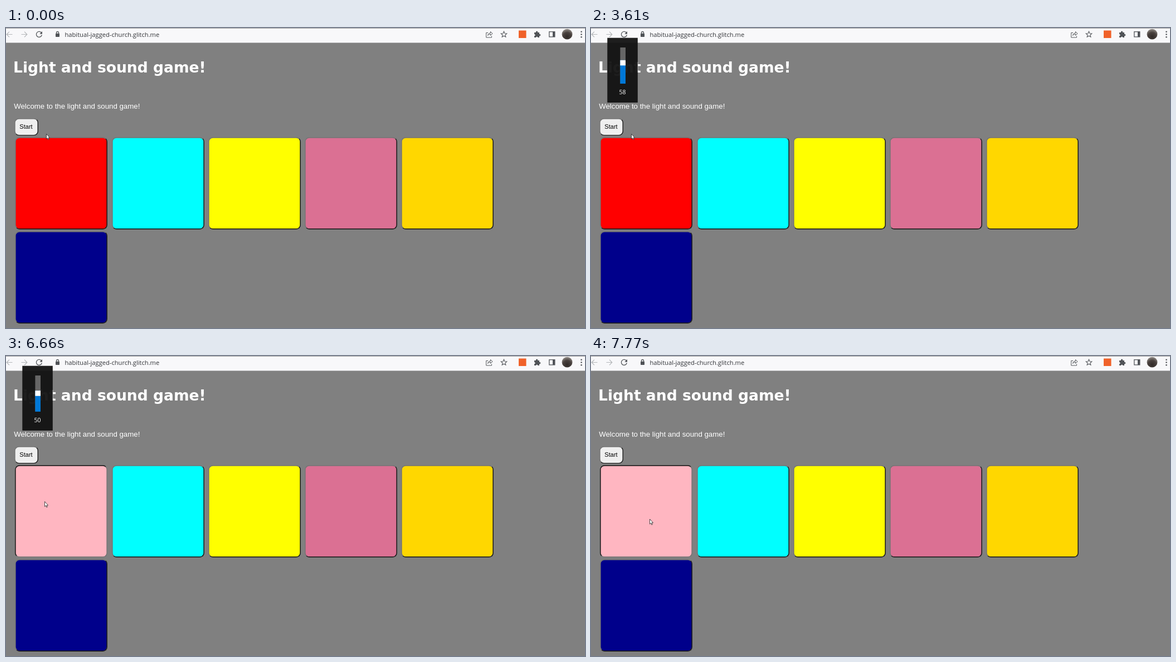
An HTML page for the animation above (8000 ms loop, 1039 px wide and 539 px high).

```html
<!DOCTYPE html>
<html lang="en">
<head>
<meta charset="utf-8">
<title>Light and sound game</title>
<style>
html, body { margin: 0; width: 100%; height: 100%; overflow: hidden; background: #808080; }
svg, .btn { position: absolute; }
svg { left: 0; top: 0; }
.btn {
  box-sizing: border-box; transform: scale(.83); transform-origin: 0 0;
  border: 2px solid; border-radius: 10px;
  border-color: #767676 #212121 #212121 #767676;
}
.tile { width: 200px; height: 200px; }
.tile.pressed { background: lightpink !important; border-color: #212121 #767676 #767676 #212121; }
#start { left: 15px; top: 162px; width: 51.5px; height: 38px; background: #efefef; }
.ui { font-family: "Open Sans", sans-serif; }
.page { font-family: "Liberation Sans", Arial, sans-serif; }
</style>
</head>
<body>
<div id="start" class="btn"></div>
<svg width="1039" height="539" viewBox="0 0 1039 539">
  <defs>
    <radialGradient id="photo" cx=".5" cy=".75" r=".7">
      <stop offset="0" stop-color="#302a28"/><stop offset=".6" stop-color="#49413e"/><stop offset="1" stop-color="#8b8580"/>
    </radialGradient>
  </defs>

  <!-- browser bar -->
  <rect width="1039" height="26.5" fill="#f8f8fa"/>
  <rect width="1039" height="1" fill="#a0a0a0"/>
  <g fill="none" stroke="#b4b6b9" stroke-width="1.2">
    <path d="M11.5 11.5H1.5M6 6.7L1.2 11.5L6 16.3"/>
    <path d="M27.500 11.5H37.5M33 6.7L37.8 11.5L33 16.3"/>
  </g>
  <g fill="none" stroke="#55585c" stroke-width="1.3">
    <path d="M63.600 8.700A5 5 0 1 0 64.300 12.500"/>
    <path d="M90.500 10V8.500a2 2 0 0 1 4 0V10"/>
    <path d="M865 8.500H861.700V17H871.500V14.500M864.500 13.500C865 10.500 867 9 869.500 9V6.500L873 10L869.500 13.300V11C867.300 11 865.700 11.800 864.500 13.500Z" stroke-width="1"/>
    <path d="M893.500 6.200L895 9.700L898.800 10L895.900 12.500L896.800 16.200L893.500 14.200L890.200 16.200L891.100 12.500L888.200 10L892 9.700Z" stroke-width="1.1"/>
    <rect x="974.800" y="6.700" width="10" height="9.200"/>
  </g>
  <g fill="#505357">
    <path d="M65 6V10.700H60.300Z"/>
    <rect x="89" y="9.700" width="7" height="6.300" rx=".8"/>
    <path d="M948 8H951V7a1.600 1.600 0 0 1 3.200 0V8H957V11H957.800a1.600 1.600 0 0 1 0 3.200H957V17H954.300a1.600 1.600 0 0 0 -3.200 0H948V14.300a1.600 1.600 0 0 0 0 -3.200Z"/>
    <rect x="981" y="6.500" width="4" height="9.500"/>
    <circle cx="1032.500" cy="6.800" r="1.300"/><circle cx="1032.500" cy="11.500" r="1.300"/><circle cx="1032.500" cy="16.200" r="1.300"/>
  </g>
  <rect x="920" y="4.500" width="13.500" height="13.500" fill="#f0622a"/>
  <circle cx="1007" cy="11.200" r="9.400" fill="url(#photo)"/>
  <text class="ui" x="105.500" y="15.500" font-size="11.150" fill="#333539">habitual-jagged-church.glitch.me</text>

  <!-- page text -->
  <text x="13" y="80.300" font-family="'DejaVu Sans', Verdana, sans-serif" font-weight="bold" font-size="26.560" fill="#fff">Light and sound game!</text>
  <text class="page" x="14.200" y="144.500" font-size="13.280" fill="#fff">Welcome to the light and sound game!</text>
  <text class="page" x="24.300" y="181.200" font-size="11.070">Start</text>

  <!-- volume flyout -->
  <g id="flyout">
    <rect x="29.300" y="17.700" width="54.500" height="116.300" fill="#101010" fill-opacity=".94"/>
    <rect x="52.400" y="35" width="9.600" height="65" fill="#666"/>
    <rect id="level" x="52.400" width="9.600" fill="#0078d7"/>
    <rect id="thumb" x="52.400" width="9.600" height="9.500" fill="#fff"/>
    <text id="number" class="ui" x="56.500" y="118.600" font-size="10.500" text-anchor="middle" fill="#fff"></text>
  </g>
</svg>
<svg width="1039" height="539" style="z-index:1">
  <path id="cursor" d="M0 0V9L2 7.200L3.400 10.300L4.700 9.700L3.400 6.700H6Z" fill="#fff" stroke="#222" stroke-width=".8"/>
</svg>
<script>
const $ = id => document.getElementById(id);
const LOOP = 8000;

const tiles = ['red', 'cyan', 'yellow', 'palevioletred', 'gold', 'darkblue'].map((color, i) => {
  const tile = document.createElement('div');
  tile.className = 'btn tile';
  tile.style.background = color;
  tile.style.left = 16.3 + i % 5 * 173.2 + 'px';
  tile.style.top = 195.5 + Math.floor(i / 5) * 169.6 + 'px';
  document.body.append(tile);
  return tile;
});

// Evenly spaced [time, value] steps; the last one lands on `end`.
const ramp = (from, to, count, start, end) => Array.from({ length: count }, (_, i) => [
  from + (to - from) * i / (count - 1),
  Math.round((start + (end - start) * (i + 1) / count) / 2) * 2
]);

const volume = [
  [0, 52],
  ...ramp(800, 1760, 8, 52, 68),
  ...ramp(1900, 2160, 3, 68, 84),
  [2570, 82],
  ...ramp(3210, 3610, 4, 82, 58),
  ...ramp(4360, 4990, 4, 58, 50)
];
const opacity = [[0, 0], [250, .5], [400, 1], [7230, .75], [7380, .36], [7530, .06], [7650, 0]];
const pointer = [
  [0, [72.5, 190.5]],
  [5890, [108, 236]], [6020, [157, 303]], [6150, [59, 281]], [6290, [69.5, 261.5]],
  [6950, [100, 259]], [7090, [160, 262]], [7230, [230, 260]], [7380, [266.5, 257.5]],
  [7530, [215, 270]], [7650, [118, 288]], [7770, [105.5, 293]]
];
const pressed = [[0, false], [6660, true], [6810, false], [7770, true]];

const valueAt = (steps, t) => steps.findLast(([time]) => time <= t)[1];

function draw(now) {
  const t = now % LOOP;
  const v = valueAt(volume, t);
  const top = 34.5 + .555 * (100 - v);
  $('flyout').setAttribute('opacity', valueAt(opacity, t));
  $('thumb').setAttribute('y', top);
  $('level').setAttribute('y', top);
  $('level').setAttribute('height', 100 - top);
  $('number').textContent = v;
  $('cursor').setAttribute('transform', `translate(${valueAt(pointer, t)})`);
  tiles[0].classList.toggle('pressed', valueAt(pressed, t));
  requestAnimationFrame(() => draw(performance.now()));
}
draw(performance.now());
</script>
</body>
</html>
```
